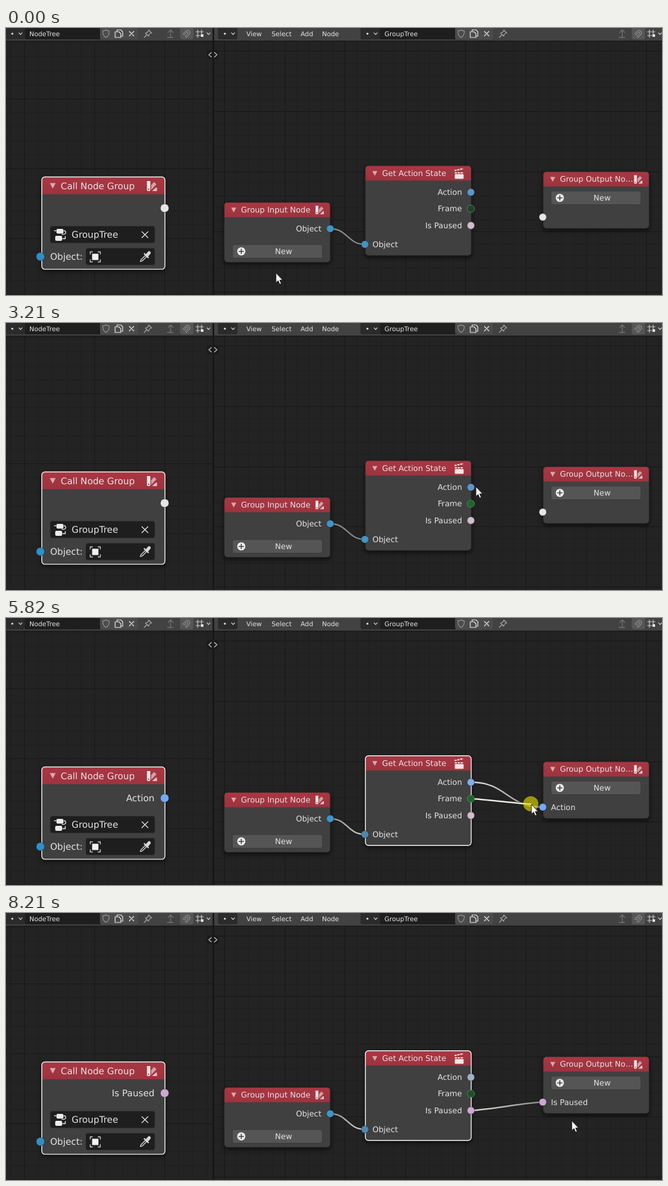
Write an HTML page that moves like this. It is 1040x424 px and loops after 8.28 s.

```html
<!DOCTYPE html>
<html lang="en">
<head>
<meta charset="utf-8">
<title>Node group sockets</title>
<style>
html, body { margin: 0; width: 100%; height: 100%; overflow: hidden; background: #232323; }
svg { display: block; }
text { font-family: "DejaVu Sans", Verdana, sans-serif; fill: #e4e4e4; text-rendering: geometricPrecision; white-space: pre; }
</style>
</head>
<body>
<svg id="stage" width="1040" height="424" viewBox="0 0 1040 424">
  <defs>
    <linearGradient id="red" x1="0" y1="0" x2="0" y2="1">
      <stop offset="0" stop-color="#a93743"/><stop offset="1" stop-color="#9d333e"/>
    </linearGradient>
    <linearGradient id="fadeOut" gradientUnits="userSpaceOnUse" x1="737" y1="0" x2="851" y2="0">
      <stop offset="0" stop-color="#dcdcd8"/><stop offset="1" stop-color="#858585"/>
    </linearGradient>
    <linearGradient id="fadeIn" gradientUnits="userSpaceOnUse" x1="514" y1="0" x2="569" y2="0">
      <stop offset="0" stop-color="#8a8a8a"/><stop offset="1" stop-color="#d4d4d2"/>
    </linearGradient>
    <filter id="blur" x="-20%" y="-20%" width="140%" height="140%"><feGaussianBlur stdDeviation="3"/></filter>
  </defs>
</svg>
<script>
const LOOP = 8280;
const NS = 'http://www.w3.org/2000/svg';
const stage = document.getElementById('stage');

function el(parent, tag, attrs, text) {
  const e = document.createElementNS(NS, tag);
  for (const k in attrs) e.setAttribute(k, attrs[k]);
  if (text !== undefined) e.textContent = text;
  parent.appendChild(e);
  return e;
}
const set = (e, attrs) => { for (const k in attrs) e.setAttribute(k, attrs[k]); };
const show = (e, on) => e.setAttribute('visibility', on ? 'visible' : 'hidden');
const group = (parent, x, y, scale = 1) =>
  el(parent, 'g', { transform: `translate(${x} ${y}) scale(${scale})` });
const rect = (p, x, y, w, h, fill, rx = 0) => el(p, 'rect', { x, y, width: w, height: h, fill, rx });
const fillPath = (p, d, fill) => el(p, 'path', { d, fill });
const line = (p, d, stroke, w = 1.2) =>
  el(p, 'path', { d, stroke, fill: 'none', 'stroke-width': w, 'stroke-linecap': 'round', 'stroke-linejoin': 'round' });
const label = (p, x, y, size, text, anchor = 'start') =>
  el(p, 'text', { x, y, 'font-size': size, 'text-anchor': anchor }, text);
const socket = (p, cx, cy, fill, r = 5.8) =>
  el(p, 'circle', { cx, cy, r, fill, stroke: '#000', 'stroke-opacity': 0.4, 'stroke-width': 0.7 });

// Backdrop grids: every fifth line is darker
function grid(x0, x1, ox, oy, major) {
  const step = major / 5;
  let minor = '', strong = '';
  const add = (i, d) => { if (i % 5) minor += d; else strong += d; };
  for (let i = -30; i < 60; i++) {
    const x = Math.round(ox + i * step) + 0.5, y = Math.round(oy + i * step) + 0.5;
    if (x > x0 && x < x1) add(i, `M${x} 21V424`);
    if (y > 21 && y < 424) add(i, `M${x0} ${y}H${x1}`);
  }
  line(stage, minor, '#1e1e1e', 1);
  line(stage, strong, '#171717', 1);
}
rect(stage, 0, 0, 1040, 424, '#232323');
grid(0, 327, 29, 112, 111);
grid(330, 1040, 346, 132, 95.6);

// Header bars
const GREY = '#d0d0d0', DIM = '#727272';
const chevron = (x, y) => line(stage, `M${x - 2.5} ${y - 1.3}L${x} ${y + 1.4}L${x + 2.5} ${y - 1.3}`, GREY);
const cross = (x, y, r, c = GREY) =>
  line(stage, `M${x - r} ${y - r}L${x + r} ${y + r}M${x + r} ${y - r}L${x - r} ${y + r}`, c, 1.3);

function picker(x, name) {
  rect(stage, x, -3, 31, 21, '#2b2b2b', 3);
  el(stage, 'circle', { cx: x + 11, cy: 9, r: 1.6, fill: '#e6e6e6' });
  chevron(x + 24, 9);
  if (!name) return;
  rect(stage, x + 31, -3, 120, 21, '#1e1e1e');
  label(stage, x + 38, 13, 10.3, name);
  rect(stage, x + 150, -3, 60, 21, '#4b4b4b', 3);
  const g = group(stage, x + 159.5, 9);
  line(g, 'M-5 -4.5Q-2 -4.5 0 -6Q2 -4.5 5 -4.5Q5.5 3 0 6Q-5.5 3 -5 -4.5Z', '#999', 1.1);
  line(group(stage, x + 180, 9), 'M-3 -3V-6H3L6 -3V4H3M-6 -3H0L3 0V6H-6Z', '#e6e6e6', 1.2);
  cross(x + 200, 9, 3.5, '#e0e0e0');
  line(group(stage, x + 226, 9), 'M1 -6L6 -1L4 -1L1.5 2L1 4L-4 -1L-2 -1.5L1 -4ZM-2 2L-6 6', '#a9a9a9', 1.1);
}
function tools(x) {
  line(group(stage, x, 9), 'M-5 6H4M0 6V-6M-4 -2L0 -6L4 -2', DIM, 1.3);
  rect(stage, x + 15, -3, 21, 21, '#565656', 3);
  line(group(stage, x + 25, 9), 'M-5 0L-1 -4Q3 -7 5.5 -3Q6.5 0 3 3L0 6L-1.8 4.2L2 0.5Q3.5 -1.5 2 -2.4Q1 -3 -0.5 -1.5L-3.2 1.8Z', '#a2a2a2', 1);
  line(group(stage, x + 46, 9), 'M-6 -3H6M-6 3H1M-3 -6V6M3 -6V1', '#c8c8c8', 1.2);
  rect(stage, x + 48, 10, 4, 4, '#e8e8e8');
  chevron(x + 60, 9);
}
rect(stage, 0, 0, 1040, 20, '#424242');
rect(stage, 0, 20, 1040, 1.5, '#1b1b1b');
picker(-1, 'NodeTree');
tools(261);
picker(336, '');
[[381, 'View'], [421, 'Select'], [467, 'Add'], [501, 'Node']].forEach(([x, s]) => label(stage, x, 13, 10.3, s));
picker(562, 'GroupTree');
tools(977);
rect(stage, 327.5, 0, 2.5, 424, '#161616');
rect(stage, 319, 35, 18, 15, '#1b1b1b', 4);
line(stage, 'M325.5 39L321.5 42.5L325.5 46M330.5 39L334.5 42.5L330.5 46', '#c4c4c4', 1.2);

// Links lie under the nodes
const links = el(stage, 'g', {});
function makeLink() {
  const g = el(links, 'g', {});
  return { g, back: line(g, '', '#161616', 4), front: line(g, '', '#868686', 2.4) };
}
// Flat links get shorter handles
function drawLink(link, x0, y0, x1, y1, color) {
  const dx = Math.abs(x1 - x0);
  const h = 0.5 * Math.min(dx, 3.25 * Math.abs(y1 - y0));
  const d = `M${x0} ${y0}C${x0 + h} ${y0} ${x1 - h} ${y1} ${x1} ${y1}`;
  set(link.back, { d });
  set(link.front, { d, stroke: color });
}

function swatches(p, x, y, s) {
  const g = group(p, x, y, s);
  fillPath(g, 'M-7 -7.5H-2V6Q-2 7.5 -4.5 7.5Q-7 7.5 -7 6Z', '#eee4e5');
  fillPath(g, 'M-0.8 -1.5L3.5 -6L7 -2.5L-0.8 5.5Z', '#d3a0a5');
  fillPath(g, 'M0.5 7.5L6 2.2H7.8V7.5Z', '#e0bdc0');
  el(g, 'circle', { cx: -4.5, cy: 4.8, r: 1, fill: '#a2343f' });
}
function clapper(p, x, y) {
  const g = group(p, x, y);
  rect(g, -6.5, 1, 14, 7.5, '#f0e6e7', 1);
  for (const d of ['M-7 -4.6L7 -7.6', 'M-6.5 -0.9H7.5'])
    set(line(g, d, '#f0e6e7', 2), { 'stroke-linecap': 'butt', 'stroke-dasharray': '3.4 1.2' });
}
function makeNode(x, y, w, h, head, title, size, s) {
  const g = el(stage, 'g', {});
  const shade = rect(g, x - 1, y + 2, w + 2, h + 2, '#000', 6);
  set(shade, { filter: 'url(#blur)', opacity: 0.55 });
  const body = rect(g, x, y, w, h, '#404040', 5);
  fillPath(g, `M${x} ${y + head}V${y + 5}q0 -5 5 -5H${x + w - 5}q5 0 5 5V${y + head}Z`, 'url(#red)');
  const edge = rect(g, x, y, w, h, 'none', 5);
  const cy = y + head / 2;
  const tx = x + 15 * s;
  fillPath(g, `M${tx - 4 * s} ${cy - 3.4 * s}h${8 * s}l${-4 * s} ${7.6 * s}Z`, '#d9a9ad');
  label(g, x + (s > 1 ? 30 : 26.5), Math.round(cy + size * 0.365), size, title);
  return {
    g,
    height(v) { set(body, { height: v }); set(edge, { height: v }); set(shade, { height: v + 2 }); },
    select(on) { set(edge, { stroke: on ? '#f0f0f0' : '#2a2a2a', 'stroke-width': on ? 1.4 : 0.8 }); }
  };
}
function newButton(p, x, y) {
  const g = el(p, 'g', {});
  set(rect(g, x, y, 142.5, 21.5, '#555', 3), { stroke: '#363636', 'stroke-width': 0.8 });
  el(g, 'circle', { cx: x + 14, cy: y + 10.7, r: 6.5, fill: '#ececec' });
  line(g, `M${x + 10.5} ${y + 10.7}h7M${x + 14} ${y + 7.2}v7`, '#444', 1.6);
  label(g, x + 81, y + 15, 12.4, 'New', 'middle');
  return g;
}

// Call Node Group
const CALL_R = 6.6;
const call = makeNode(56.7, 236.5, 195.3, 146.6, 27.5, 'Call Node Group', 14.4, 1.16);
call.select(true);
swatches(call.g, 231, 251, 1.08);
for (const [x, y, w] of [[70, 314.5, 166], [126.5, 349.5, 109.5]])
  set(rect(call.g, x, y, w, 27, '#1e1e1e', 3.5), { stroke: '#353535', 'stroke-width': 0.8 });
const tree = group(call.g, 86, 328);
rect(tree, -6, -9, 11, 7.5, '#ececec', 2);
rect(tree, -8, 2, 11, 8, '#ececec', 2);
line(tree, 'M-7 -6H-9M6 -6Q9.5 -6 8.5 -2Q7.5 0 3 -0.5M4 6.5H8V3', '#ececec', 1.3);
label(call.g, 104, 333, 14.4, 'GroupTree');
line(call.g, 'M215.5 323.5l9.5 9.5m0 -9.5l-9.5 9.5', '#e0e0e0', 1.3);
label(call.g, 70, 368, 14.4, 'Object:');
rect(call.g, 136.5, 358.5, 10, 10, '#f2f2f2');
line(call.g, 'M133.5 359v-3.5h3.5M146 355.5h3.5v3.5M149.5 368v3.5h-3.5M137 371.5h-3.5v-3.5', '#cfcfcf', 1.3);
const dropper = group(call.g, 221, 363);
line(dropper, 'M1 -3L-7 5L-8 8L-5 7L3 -1', '#d8d8d8', 1.3);
line(dropper, 'M-1.5 -4.5L4.5 1.5', '#d8d8d8', 2.2);
line(dropper, 'M2.5 -2L6 -6', '#d8d8d8', 5);
socket(call.g, 54.5, 363, '#2f8fc6', CALL_R);
const callNew = socket(call.g, 54.5, 393.7, '#e6e6e6', CALL_R);
const callOut = socket(call.g, 251.5, 286, '#e6e6e6', CALL_R);
const callName = label(call.g, 235.5, 291, 14.4, '', 'end');

// Group Input Node
const input = makeNode(346, 277, 168, 95, 23.5, 'Group Input Node', 12.4, 1);
input.select(false);
swatches(input.g, 497, 289, 0.9);
label(input.g, 500, 323, 12.4, 'Object', 'end');
socket(input.g, 514, 318.7, '#3f94c6');
const inputNew = socket(input.g, 514, 345.1, '#e6e6e6');
const inputButton = newButton(input.g, 359, 344);

// Get Action State
const state = makeNode(569.7, 218.8, 167.8, 142.4, 23.5, 'Get Action State', 12.4, 1);
clapper(state.g, 718, 231);
const OUT_Y = [260.8, 287, 313.6];
const NAMES = ['Action', 'Frame', 'Is Paused'];
const outs = OUT_Y.map((y, i) => {
  label(state.g, 723, Math.round(y + 4.4), 12.4, NAMES[i], 'end');
  return socket(state.g, 737, y, '#d0bccb');
});
set(outs[1], { stroke: '#5f9468', 'stroke-opacity': 0.8, 'stroke-width': 0.9 });
label(state.g, 581, 348, 12.4, 'Object');
const stateIn = socket(state.g, 569, 343.6, '#4394c4');

// Group Output Node
const output = makeNode(851.7, 228.2, 167.8, 90, 23.5, 'Group Output No…', 12.2, 1);
output.select(false);
swatches(output.g, 1002, 240.5, 0.9);
newButton(output.g, 864, 259);
const outSocket = socket(output.g, 851, 300.3, '#e6e6e6');
const outName = label(output.g, 864, 305, 12.4, '');

const baseLink = makeLink(), oldLink = makeLink(), dragLink = makeLink();
const halo = el(stage, 'circle', { r: 12, fill: '#ece000', 'fill-opacity': 0.61 });
const cursor = el(stage, 'path', {
  d: 'M0 0V15.4L3.5 12.2L5.9 18L8.4 16.9L6 11.3H10.6Z',
  fill: '#fff', stroke: '#111', 'stroke-width': 0.9, 'stroke-linejoin': 'round'
});

// Pointer path: time, x, y
const PATH = [
  [200, 428, 389], [500, 424, 352], [1070, 424, 352], [1560, 494, 375], [2160, 494, 375],
  [2480, 640, 316], [2740, 774, 268], [2930, 768, 264], [3000, 768, 264], [3200, 745, 260],
  [3290, 745, 260], [3340, 742, 259], [3400, 742, 259], [3820, 811, 277], [4110, 859, 299],
  [4450, 859, 299], [4590, 852, 299], [4660, 852, 299], [5070, 736, 285], [5400, 736, 285],
  [5815, 833, 296], [5890, 833, 296], [6040, 852, 299], [6090, 852, 299], [6220, 842, 299],
  [6240, 842, 299], [6640, 741, 312], [6840, 741, 312], [7115, 798, 308], [7190, 798, 308],
  [7550, 852, 298], [8020, 852, 298], [8205, 897, 330]
];
const PRESS = [[600, 740], [1760, 1890], [3340, 4450], [5400, 6080], [6840, 7740]];
const TINT = ['#74a9f6', '#237a36', '#cfa6d4'];

function pointer(t) {
  const i = PATH.findIndex(k => k[0] > t);
  if (i < 0) return PATH[PATH.length - 1].slice(1);
  if (i === 0) return PATH[0].slice(1);
  const [t0, x0, y0] = PATH[i - 1], [t1, x1, y1] = PATH[i];
  const u = (t - t0) / (t1 - t0);
  return [x0 + (x1 - x0) * u, y0 + (y1 - y0) * u];
}

function render(t) {
  const [x, y] = pointer(t);
  const press = PRESS.findIndex(([a, b]) => t >= a && t < b);
  const linked = t < 4450 ? -1 : t < 6080 ? 0 : t < 7740 ? 1 : 2;
  const selected = t >= 5400;
  const grown = t >= 740 && t < 1890;

  set(cursor, { transform: `translate(${x} ${y})` });
  set(halo, { cx: x - 1, cy: y - 1 });
  show(halo, press >= 0);

  call.height(grown ? 177.3 : 146.6);
  input.height(grown ? 121.4 : 95);
  set(inputButton, { transform: `translate(0 ${grown ? 26.4 : 0})` });
  show(callNew, grown);
  show(inputNew, grown);

  state.select(selected);
  drawLink(baseLink, 514, 318.7, 569, 343.6, selected ? 'url(#fadeIn)' : '#868686');

  show(oldLink.g, linked >= 0);
  if (linked >= 0) drawLink(oldLink, 737, OUT_Y[linked], 851, 300.3, selected ? 'url(#fadeOut)' : '#868686');

  const drag = press - 2;
  show(dragLink.g, drag >= 0);
  if (drag >= 0) {
    const snap = x > 845;
    drawLink(dragLink, 737, OUT_Y[drag], snap ? 851 : x - 1, snap ? 300.3 : y - 0.5, selected ? '#e9e9e2' : '#868686');
  }

  const name = linked < 0 ? '' : NAMES[linked];
  const tint = linked < 0 ? '#e6e6e6' : TINT[linked];
  callName.textContent = outName.textContent = name;
  set(callOut, { fill: tint });
  set(outSocket, { fill: tint });
  set(outs[0], { fill: t < 3890 ? '#5d96c8' : t < 6290 ? '#82ade8' : '#9fb0cc' });
  set(outs[1], { fill: t < 3000 ? '#1d4224' : t < 7740 ? '#20652c' : '#1e5027' });
  set(outs[2], { fill: linked === 2 ? TINT[2] : '#d0bccb' });
  set(stateIn, { fill: selected ? '#4f88ae' : '#4394c4' });
}

let start;
function tick(now) {
  if (start === undefined) start = now;
  render((now - start) % LOOP);
  requestAnimationFrame(tick);
}
render(0);
requestAnimationFrame(tick);
</script>
</body>
</html>
```
